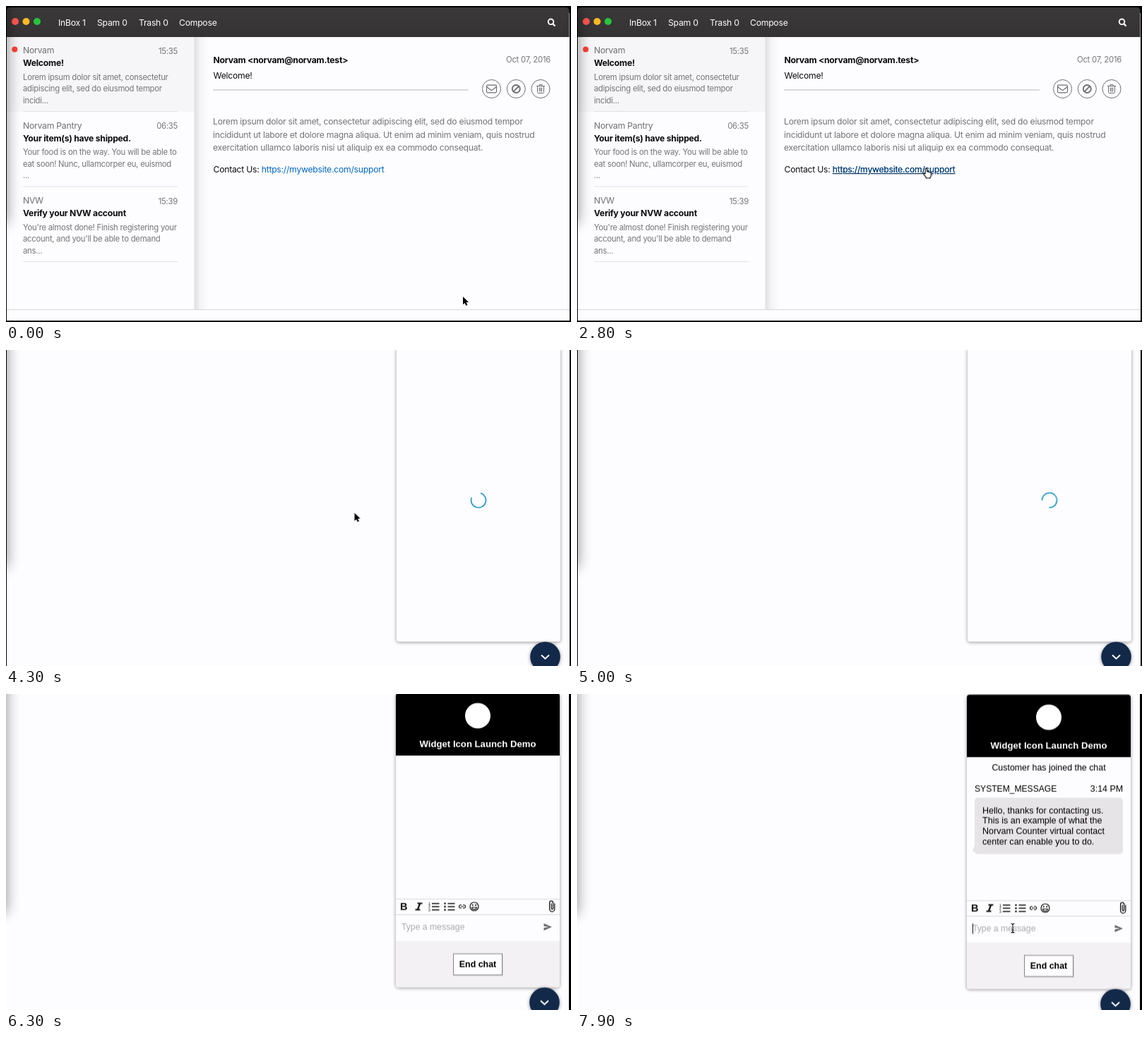
Animation of 800 by 448 pixels, one loop 8 s. Source, as an HTML page:

```html
<!DOCTYPE html>
<html lang="en">
<head>
<meta charset="utf-8">
<title>Mail to chat widget</title>
<style>
html, body { margin: 0; height: 100%; overflow: hidden; background: #000; }
svg { display: block; width: 800px; height: 448px; }
text { white-space: pre; }

.mail { font: 12.2px Inter, sans-serif; letter-spacing: -.02em; fill: #0d0c0e; }
.mail .b { font-weight: 700; }
.mail .nav { fill: #fff; }
.mail .from { fill: #6e6d70; }
.mail .small { font-size: 11.3px; fill: #757477; }
.mail .body { fill: #747376; }
.mail .link { fill: #0068c4; }
.mail .over { fill: #0a3a69; text-decoration: underline; }
.mail .skip { fill: none; }
.end { text-anchor: end; }
.mid { text-anchor: middle; }
.rule { stroke: #e2e1e4; }
.ico { fill: none; stroke: #6d6c6f; }

.chat { font: 12.4px "Liberation Sans", Arial, sans-serif; fill: #000; }
.chat .b { font-weight: 700; }
.tools { fill: none; stroke: #111; stroke-width: 1.6; }
.tools .solid { fill: #111; stroke: none; }
.panel { filter: drop-shadow(0 1px 2.5px rgba(0,0,0,.42)); }
.edge { filter: blur(10px); }

/* one loop is 8 s, so 1% is 80 ms */
.pan, .mail, .page2, .over, .widget, .spin, .loaded, .joined, .reply, .caret,
.cursor, .arrow, .hand, .beam { animation: 8s step-end infinite; }
.pan { animation-name: pan; }
.mail { animation-name: mail; }
.page2 { animation-name: page2; }
.over { animation-name: hover; }
.widget { animation-name: open; animation-timing-function: ease-out; }
.spin { animation-name: load; }
.loaded { animation-name: loaded; }
.joined { animation-name: joined; }
.reply { animation-name: reply; }
.caret { animation-name: caret; }
.cursor { animation-name: move; animation-timing-function: ease-in-out; }
.arrow { animation-name: arrow; }
.hand { animation-name: hover; }
.beam { animation-name: beam; }
.turn { animation: turn 1s -.7s linear infinite; transform-origin: 669px 213px; }

@keyframes pan {
  0% { transform: none; }
  72.5% { transform: none; animation-timing-function: ease-out; }
  78.5% { transform: translate(-1px, 2.3px); }
  83.6%, 100% { transform: translate(-1px, 4.5px); }
}
@keyframes mail { 0% { opacity: 1; } 36.2%, 100% { opacity: 0; } }
@keyframes page2 { 0% { opacity: 0; } 36.2%, 100% { opacity: 1; } }
@keyframes hover { 0% { opacity: 0; } 25% { opacity: 1; } 36.2%, 100% { opacity: 0; } }
@keyframes open { 0%, 39.5% { opacity: 0; } 43.5%, 100% { opacity: 1; } }
@keyframes load { 0% { opacity: 0; } 42.4% { opacity: 1; } 63.7%, 100% { opacity: 0; } }
@keyframes loaded { 0% { opacity: 0; } 63.7%, 100% { opacity: 1; } }
@keyframes joined { 0% { opacity: 0; } 86.2%, 100% { opacity: 1; } }
@keyframes reply { 0% { opacity: 0; } 89.9%, 100% { opacity: 1; } }
@keyframes caret { 0% { opacity: 0; } 94.9%, 100% { opacity: 1; } }
@keyframes arrow {
  0% { opacity: 1; } 25% { opacity: 0; } 36.2% { opacity: 1; }
  62.4% { opacity: 0; } 86.2% { opacity: 1; } 91.2%, 100% { opacity: 0; }
}
@keyframes beam { 0% { opacity: 0; } 91.2%, 100% { opacity: 1; } }
@keyframes move {
  0%, .4% { transform: translate(647px, 412px); }
  3.7%, 8.2% { transform: translate(431px, 242px); }
  13.7% { transform: translate(419.5px, 254.5px); }
  19% { transform: translate(421px, 251px); }
  29%, 62.5% { transform: translate(493.5px, 231px); }
  63%, 86% { transform: translate(742px, 452px); }
  92%, 96% { transform: translate(588px, 332px); }
  98.7%, 100% { transform: translate(617px, 332px); }
}
@keyframes turn { to { transform: rotate(360deg); } }
</style>
</head>
<body>
<svg viewBox="0 0 800 448">
  <defs>
    <linearGradient id="bar" x2="0" y2="1">
      <stop stop-color="#3b393a"/><stop offset="1" stop-color="#343233"/>
    </linearGradient>
    <linearGradient id="fold">
      <stop stop-opacity=".12"/><stop offset=".4" stop-opacity=".04"/><stop offset="1" stop-opacity="0"/>
    </linearGradient>
  </defs>

  <g class="pan">
    <rect x="1" y="-10" width="797" height="470" fill="#fdfcfe"/>

    <g class="mail">
      <path d="M0 0H800V10H0ZM0 446H800V448H0Z" fill="#000"/>
      <path d="M1 44V7Q1 2 6 2H792Q797.500 2 797.500 7V44Z" fill="url(#bar)"/>
      <circle cx="13" cy="22" r="5" fill="#ff5750"/>
      <circle cx="28.500" cy="22" r="5" fill="#fdb924"/>
      <circle cx="44" cy="22" r="5" fill="#27c53c"/>
      <g class="nav">
        <text x="74" y="27.500">InBox 1</text>
        <text x="129" y="27.500">Spam 0</text>
        <text x="188" y="27.500">Trash 0</text>
        <text x="245" y="27.500">Compose</text>
      </g>
      <path d="M774.500 25.500L777.500 28.500" stroke="#fff" stroke-width="2.400"/>
      <circle cx="771.500" cy="22.300" r="3.800" fill="none" stroke="#fff" stroke-width="1.900"/>

      <rect x="1" y="44" width="265.500" height="106" fill="#f6f5f7"/>
      <rect x="266.500" y="44" width="20" height="386" fill="url(#fold)"/>
      <circle cx="12.300" cy="61.600" r="4" fill="#ff3f37"/>

      <g>
        <text class="from" x="24" y="67">Norvam</text>
        <text class="small end" x="243" y="67.500">15:35</text>
        <text class="b" x="24" y="85.400">Welcome!</text>
        <g class="small">
          <text x="24" y="104.500">Lorem ipsum dolor sit amet, consectetur</text>
          <text x="24" y="121.200">adipiscing elit, sed do eiusmod tempor</text>
          <text x="24" y="137.900">incidi...</text>
        </g>
        <path class="rule" d="M24 149.500H243"/>
      </g>
      <g transform="translate(0 106.500)">
        <text class="from" x="24" y="67">Norvam Pantry</text>
        <text class="small end" x="243" y="67.500">06:35</text>
        <text class="b" x="24" y="85.400">Your item(s) have shipped.</text>
        <g class="small">
          <text x="24" y="104.500">Your food is on the way. You will be able to</text>
          <text x="24" y="121.200">eat soon! Nunc, ullamcorper eu, euismod</text>
          <text x="24" y="137.900">...</text>
        </g>
        <path class="rule" d="M24 149.500H243"/>
      </g>
      <g transform="translate(0 213)">
        <text class="from" x="24" y="67">NVW</text>
        <text class="small end" x="243" y="67.500">15:39</text>
        <text class="b" x="24" y="85.400">Verify your NVW account</text>
        <g class="small">
          <text x="24" y="104.500">You're almost done! Finish registering your</text>
          <text x="24" y="121.200">account, and you'll be able to demand</text>
          <text x="24" y="137.900">ans...</text>
        </g>
        <path class="rule" d="M24 149.500H243"/>
      </g>

      <text class="b" x="293.500" y="80.700">Norvam &lt;norvam@norvam.test&gt;</text>
      <text x="293.500" y="103">Welcome!</text>
      <text class="small end" x="771" y="79.500">Oct 07, 2016</text>
      <path d="M293 119H655" stroke="#cfced3" stroke-width="1.300"/>

      <g class="ico">
        <circle cx="687.500" cy="117.500" r="13"/>
        <circle cx="722.300" cy="117.500" r="13"/>
        <circle cx="757" cy="117.500" r="13"/>
        <rect x="680.500" y="112.200" width="14" height="10.600" rx="1.500" stroke-width="1.200"/>
        <path d="M680.500 114.500L686 118.800Q687.500 119.800 689 118.800L694.500 114.500" stroke-width="1.200"/>
        <circle cx="722.300" cy="117.500" r="5.500" stroke-width="1.900"/>
        <path d="M718.400 121.400L726.200 113.600" stroke-width="1.900"/>
        <path d="M751 113.500H763M755 113.500V111.500H759V113.500M752.500 113.500V122.500Q752.500 123.500 753.500 123.500H760.500Q761.500 123.500 761.500 122.500V113.500M755.200 115.500V121.500M757 115.500V121.500M758.800 115.500V121.500"/>
      </g>

      <g class="body">
        <text x="293" y="167.800">Lorem ipsum dolor sit amet, consectetur adipiscing elit, sed do eiusmod tempor</text>
        <text x="293" y="186.500">incididunt ut labore et dolore magna aliqua. Ut enim ad minim veniam, quis nostrud</text>
        <text x="293" y="205.200">exercitation ullamco laboris nisi ut aliquip ex ea commodo consequat.</text>
      </g>
      <text x="293.500" y="236">Contact Us: <tspan class="link">https://mywebsite.com/support</tspan></text>
      <g class="hand">
        <text x="293.500" y="236"><tspan class="skip">Contact Us: </tspan><tspan class="over">https://mywebsite.com/support</tspan></text>
      </g>
      <path d="M1 430.500H798" stroke="#d6d5d8"/>
    </g>

    <g class="page2">
      <g class="widget chat">
        <g class="panel">
          <rect x="553" y="-3.500" width="232" height="417" rx="4" fill="#fdfcfe"/>
        </g>
        <g class="spin">
          <path class="turn" d="M672 202.900A10.500 10.500 0 1 1 659.200 209.200" fill="none" stroke="#2299c6" stroke-width="1.600"/>
        </g>

        <g class="loaded">
          <path d="M553 85V.5Q553 -3.500 557 -3.500H781Q785 -3.500 785 .5V85Z"/>
          <circle cx="669" cy="28.500" r="18" fill="#fff"/>
          <text class="b mid" x="669" y="73" font-size="13.150" fill="#fff">Widget Icon Launch Demo</text>

          <path d="M553 288.500H785M553 310.500H785" stroke="#d9d8db"/>
          <g class="tools">
            <text class="solid b" x="559" y="304.200" font-size="14.500">B</text>
            <path d="M583.500 294.500H590.500M580.500 303.500H587.500M587.200 294.500L583.800 303.500" stroke-width="2.200"/>
            <path d="M604 294.800H614.500M604 299.300H614.500M604 303.800H614.500M626.500 294.800H636.500M626.500 299.300H636.500M626.500 303.800H636.500"/>
            <g class="solid" font-size="5">
              <text x="599" y="296.700">1</text><text x="599" y="301.200">2</text><text x="599" y="305.700">3</text>
              <circle cx="622.500" cy="294.800" r="1.300"/><circle cx="622.500" cy="299.300" r="1.300"/><circle cx="622.500" cy="303.800" r="1.300"/>
            </g>
            <path d="M646 296.800H644.700A2.200 2.200 0 0 0 644.700 301.200H646M648 296.800H649.300A2.200 2.200 0 0 1 649.300 301.200H648M645 299H649" stroke-width="1.100"/>
            <circle cx="664" cy="299" r="6" stroke-width="1.200"/>
            <path d="M660.500 300.300H667.500Q666.500 303.300 664 303.300T660.500 300.300Z" stroke-width="1.100"/>
            <circle class="solid" cx="661.800" cy="297" r="1.100"/><circle class="solid" cx="666.200" cy="297" r="1.100"/>
            <path d="M777.800 294.500V302.500A3.600 3.800 0 0 1 770.600 302.500V293.700A2.500 2.700 0 0 1 775.600 293.700V301.600A1.200 1.300 0 0 1 773.200 301.600V294.500" stroke-width="1.250"/>
          </g>
          <text x="561" y="332.200" font-size="12.200" fill="#aaa9ad">Type a message</text>
          <path d="M762.500 323L774 328L762.500 333V329.200L770 328L762.500 326.800Z" fill="#666568"/>
          <path d="M553 348H785V409.500Q785 413.500 781 413.500H557Q553 413.500 553 409.500Z" fill="#f3f1f4"/>
          <rect x="635" y="367" width="70" height="30.500" fill="#000" opacity=".12"/>
          <rect x="634.500" y="366" width="69" height="30" fill="#fdfcfe" stroke="#858487"/>
          <text class="b mid" x="669" y="385.300">End chat</text>

          <g class="joined">
            <text class="mid" x="669" y="104.400">Customer has joined the chat</text>
          </g>
          <g class="reply">
            <text x="564" y="134.400" font-size="12.100">SYSTEM_MESSAGE</text>
            <text class="end" x="774" y="134.400">3:14 PM</text>
            <path d="M564 211L560.500 217.500L568 222.500Z" fill="#e6e4e7"/>
            <rect x="564" y="142.500" width="210" height="80" rx="5" fill="#e6e4e7"/>
            <g font-size="12.550">
              <text x="575" y="164.700">Hello, thanks for contacting us.</text>
              <text x="575" y="179.400">This is an example of what the</text>
              <text x="575" y="194">Norvam Counter virtual contact</text>
              <text x="575" y="208.600">center can enable you to do.</text>
            </g>
          </g>
          <path class="caret" d="M561.500 321V335.500" stroke="#111"/>
        </g>

        <g class="panel">
          <circle cx="763.500" cy="435" r="21.300" fill="#12294a"/>
        </g>
        <path d="M758 432.500L763.500 437.700L769 432.500" fill="none" stroke="#fff" stroke-width="2"/>
      </g>
    </g>

    <rect class="edge" x="-60" y="-60" width="61" height="368" opacity=".45"/>
    <path d="M.5 -10V460" stroke="#000"/>
    <path d="M798 -10H804V460H798Z"/>
  </g>

  <g class="cursor" stroke-linejoin="round">
    <path class="arrow" d="M0 0V11.300L2.600 8.900L4.300 12.800L6.400 11.900L4.700 8.100H8.100Z" stroke="#fff" stroke-width="1.400" paint-order="stroke"/>
    <path class="hand" d="M-.4 7V.4Q-.2 -1 .9 -1Q2 -1 2.200 .4V4Q3.600 3.300 4.400 4.400Q5.600 4 6.200 5Q7.800 4.700 8 6.300V8.500Q7.800 10.500 6.800 11.500V13H.8V11.800Q-1 9.800 -3 7.200Q-3.300 5.600 -1.800 5.900Z" fill="#fff" stroke="#000" stroke-width="1.100"/>
    <path class="beam" d="M-2.500 -6.500Q0 -6.500 0 -4.500V4.500Q0 6.500 -2.500 6.500M2.500 -6.500Q0 -6.500 0 -4.500V4.500Q0 6.500 2.500 6.500M-1.500 2.500H1.500" fill="none" stroke="#111" stroke-width="1.100"/>
  </g>
</svg>
</body>
</html>
```
